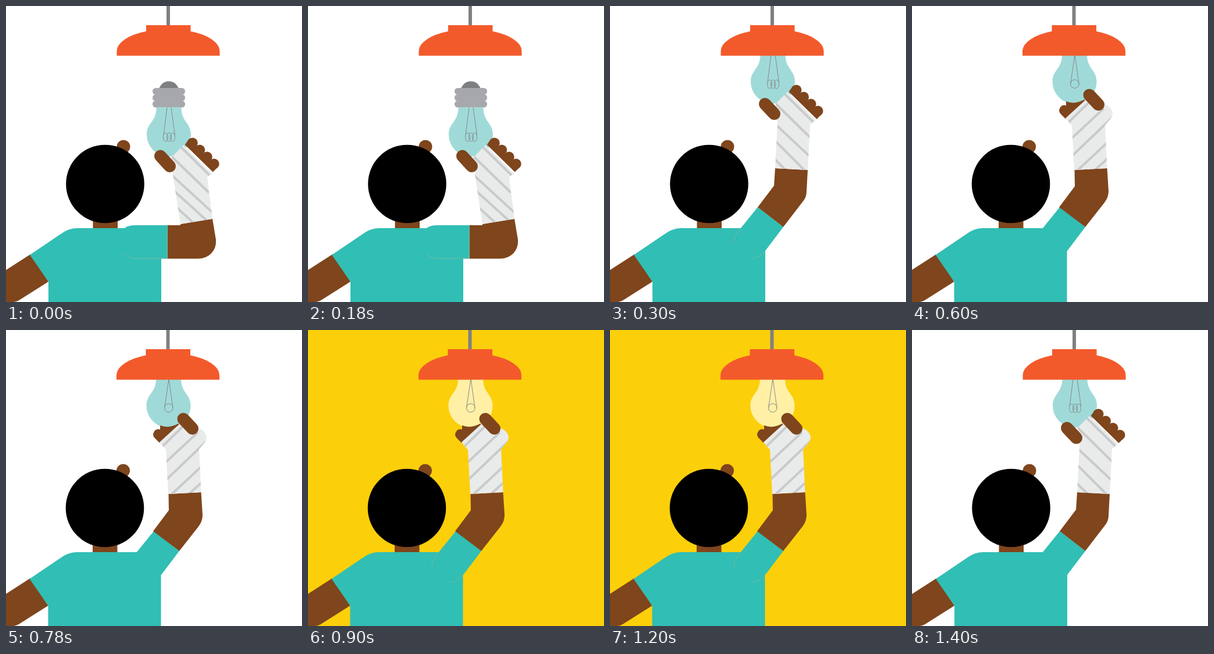
An HTML page that plays this animation: 509 by 509 pixels, repeating every 1700 ms.

```html
<!DOCTYPE html>
<html lang="en">
<head>
<meta charset="utf-8">
<title>Changing a light bulb</title>
<style>
  html, body { margin: 0; width: 100%; height: 100%; overflow: hidden; background: #fff; }
  svg { display: block; width: 100vw; height: 100vh; }
  .skin { fill: #7f451c; }
  .shirt { fill: #31beb4; }
  .lamp { fill: #f35a2b; }
  .wrap { fill: #e9ebeb; }
  .stripes { fill: none; stroke: #c9cacc; stroke-width: 4.2; }
  .wire { fill: none; stroke: #85898a; stroke-width: 1; }
  .seam { fill: none; stroke: #8fb79a; stroke-width: .8; }
  .digit { stroke: #7f451c; stroke-width: 21; stroke-linecap: round; }
</style>
</head>
<body>
<svg viewBox="0 0 509 509">
  <defs>
    <path id="lowWrap" d="M305 239L354 288L346 294L355 366L300 375L288 297L283 262Z"/>
    <path id="gripWrap" d="M305 148L354 196L344 204L340 282L284 279L288 203L285 168Z"/>
    <path id="twistWrap" d="M264 193L299 161L331 169L336 171Q350 182 342 193L332 205L335.500 279L279 282L275 206Z"/>
    <clipPath id="lowClip"><use href="#lowWrap"/></clipPath>
    <clipPath id="gripClip"><use href="#gripWrap"/></clipPath>
    <clipPath id="twistClip"><use href="#twistWrap"/></clipPath>
    <g id="fingers" class="skin">
      <path d="M307 147L355 194L363 186L314 137Z"/>
      <circle cx="320" cy="144" r="9"/>
      <circle cx="332.500" cy="156" r="9"/>
      <circle cx="345" cy="168" r="9"/>
      <circle cx="357" cy="180" r="9"/>
    </g>
  </defs>

  <rect id="room" width="509" height="509"/>

  <g id="scene">
    <path d="M279 0V34" stroke="#808083" stroke-width="6"/>
    <g id="bulb">
      <circle cx="280" cy="147" r="17.500" fill="#7d7f81"/>
      <g fill="#a6a8ab">
        <rect x="252" y="141" width="56" height="11.500" rx="5.500"/>
        <rect x="252" y="152" width="56" height="11.500" rx="5.500"/>
        <rect x="252" y="163" width="56" height="11.500" rx="5.500"/>
        <path d="M257 147H303V169H257Z"/>
      </g>
      <path id="glass" d="M258.500 174.500C258.500 200 242 200 242 221.500A38 37.500 0 0 0 318 221.500C318 200 301.500 200 301.500 174.500Z"/>
      <g class="wire" data-in="0 1 4">
        <path d="M277 174.500L271 222M284 174.500L290.500 222"/>
        <ellipse cx="274.500" cy="225.500" rx="4" ry="7.500"/>
        <ellipse cx="280.500" cy="225.500" rx="4" ry="7.500"/>
        <ellipse cx="286.500" cy="225.500" rx="4" ry="7.500"/>
      </g>
      <g class="wire" data-in="2 3">
        <path d="M280.500 175L273 225M280.500 175L287.500 225"/>
        <circle cx="280.300" cy="225" r="7.300"/>
      </g>
    </g>
    <path class="lamp" d="M190.500 85.500V77.500A88.500 37.700 0 0 1 241 43.500V33H317.500V43.500A88.500 37.700 0 0 1 367.500 77.500V85.500Z"/>

    <circle class="skin" cx="202" cy="242" r="11.500"/>
    <rect class="skin" x="149.500" y="360" width="42.500" height="23"/>
    <circle cx="170.500" cy="306" r="67.300"/>
    <path class="skin" d="M0 454L42 427L73 474L24 505Q18 509 12 509H0Z"/>
    <path class="shirt" d="M73 509V474L41 428L92 393.500Q107 382 122 382H250L267 421V509Z"/>
  </g>

  <g data-in="0">
    <path class="shirt" d="M278 377H222Q212 377 205 381V428Q212 434 224 434.500H278Z"/>
    <path class="skin" d="M278 377H300V375L355 366L361 402Q362 416 353 425.500Q344 434.500 330 434.500H278Z"/>
    <path class="seam" d="M203 427Q212 434 224 434H277.500V377"/>
    <use href="#lowWrap" class="wrap"/>
    <path class="stripes" clip-path="url(#lowClip)" d="M298 240L353 294M283 257L349 321M284 290L355 355M288 317L352 375M293 346L330 380"/>
    <use href="#fingers" x=".7" y="91.500"/>
    <path class="digit" d="M265.500 258L281.500 275.500"/>
  </g>

  <g data-in="1 2 3 4">
    <path class="shirt" d="M254 346L298 380L267 421L240 425L220 388Z"/>
    <path class="seam" data-in="1 3" d="M224 383Q212 396 213 408M246 434Q258 432 267 421"/>
  </g>

  <g data-in="1 4">
    <path class="skin" d="M284 279L340 282L338 319Q338 329 331 337L298 380L254 346L282 309Z"/>
    <use href="#gripWrap" class="wrap"/>
    <path class="stripes" clip-path="url(#gripClip)" d="M298 149L353 203M283 166L347 229M283 202L346 261M282 230L340 288M281 261L306 286"/>
    <use href="#fingers" x=".5" y=".5"/>
    <path class="digit" d="M266.500 168.500L282.500 185.500"/>
  </g>

  <g data-in="2 3">
    <path class="skin" d="M265 164Q280 170 296 161L299 163L264 194L255.500 185.500A9 9 0 0 1 265 171Z"/>
    <path class="skin" d="M279.500 282L335.500 279L338 318Q338 329 331 338L298 380L253 346L280 310Z"/>
    <use href="#twistWrap" class="wrap"/>
    <path class="stripes" clip-path="url(#twistClip)" d="M266 203L306 164M273 229L330 176M273 260L345 191M281 286L340 231M309 287L340 259"/>
    <path class="digit" d="M305 153L320.500 169.500"/>
  </g>
</svg>
<script>
  const ends = [300, 600, 900, 1400, 1700];
  const get = id => document.getElementById(id);
  const parts = document.querySelectorAll('[data-in]');
  let shown = -1;

  function show(pose) {
    const lit = pose === 3, turned = pose === 2 || lit;
    for (const part of parts)
      part.style.display = part.dataset.in.includes(pose) ? '' : 'none';
    get('room').setAttribute('fill', lit ? '#fccf0b' : '#fff');
    get('glass').setAttribute('fill', lit ? '#fff0a6' : '#a0dad8');
    get('bulb').setAttribute('transform', `translate(0 ${pose ? -91 : 0})`);
    get('scene').setAttribute('transform', `translate(${turned ? -0.5 : 0} 0)`);
  }

  function tick() {
    const time = performance.now() % 1700;
    const pose = ends.findIndex(end => time < end);
    if (pose !== shown) show(shown = pose);
    requestAnimationFrame(tick);
  }
  tick();
</script>
</body>
</html>
```
